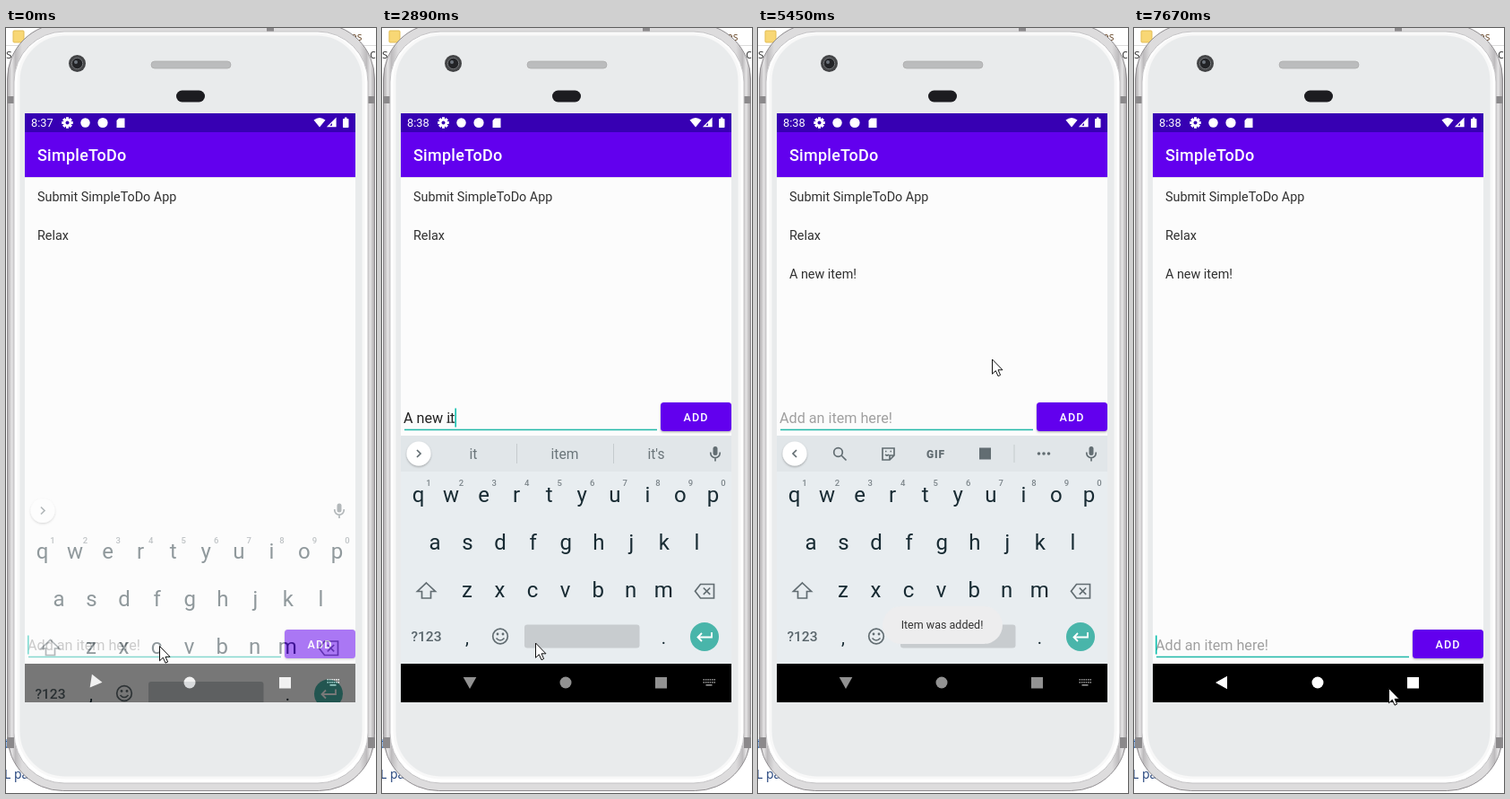
An HTML page that plays this animation: 413x852 px, repeating every 8 s.

```html
<!DOCTYPE html>
<html lang="en">
<head>
<meta charset="utf-8">
<title>To-do list demo</title>
<style>
  html, body { margin: 0; width: 100%; height: 100%; overflow: hidden; background: #fff; }
  svg { display: block; width: 413px; height: 852px; font-family: Roboto, sans-serif; }
  text { white-space: pre; }
  .mid { text-anchor: middle; }
  .line { fill: none; stroke: #626d72; stroke-width: 1.7; }
  .key { font-size: 24px; fill: #182b33; }
  .hint { font-size: 9.5px; font-weight: 500; fill: #7d868b; }
  .word { font-size: 15.6px; fill: #6b757a; }
  .item { font-size: 14.36px; fill: #303030; }
  .page { font: 14px "Open Sans", sans-serif; }
</style>
</head>
<body>
<svg viewBox="0 0 413 852">
  <defs>
    <clipPath id="screen"><path d="M21 95h369v656H21z"/></clipPath>
    <clipPath id="navArea"><path d="M21 708h369v43H21z"/></clipPath>
    <linearGradient id="metal">
      <stop offset="0" stop-color="#aaa7a9"/><stop offset=".012" stop-color="#e4e3e4"/>
      <stop offset=".022" stop-color="#bdbbbd"/><stop offset=".04" stop-color="#dddcdd"/>
      <stop offset=".96" stop-color="#dddcdd"/><stop offset=".978" stop-color="#bdbbbd"/>
      <stop offset=".988" stop-color="#e4e3e4"/><stop offset="1" stop-color="#aaa7a9"/>
    </linearGradient>
    <filter id="soft" x="-20%" y="-20%" width="140%" height="160%">
      <feDropShadow dx="0" dy="1.2" stdDeviation="1" flood-opacity=".3"/>
    </filter>
  </defs>
  <g id="desktop"></g>
  <g id="phone"></g>
  <g clip-path="url(#screen)">
    <g id="app"></g>
    <g id="nav"></g>
    <g id="keyboard"></g>
    <g id="toast">
      <rect x="139" y="644" width="134" height="42" rx="21" fill="#ededee"/>
      <text class="mid" x="205.5" y="669" font-size="12.5" fill="#333">Item was added!</text>
    </g>
  </g>
  <path id="pointer" d="M0 0V16.3L3.8 12.7L6.5 18.7L9.1 17.5L6.5 11.8H11.5Z" fill="#fff" stroke="#111" stroke-width="1"/>
</svg>
<script>
const $ = id => document.getElementById(id);
const set = (id, attrs) => { for (const k in attrs) $(id).setAttribute(k, attrs[k]); };
const label = (cls, x, y, s, more = '') => `<text class="${cls}" x="${x}" y="${y}" ${more}>${s}</text>`;
const box = (x, y, w, h, fill, more = '') => `<rect x="${x}" y="${y}" width="${w}" height="${h}" fill="${fill}" ${more}/>`;
const dot = (x, y, r, fill, more = '') => `<circle cx="${x}" cy="${y}" r="${r}" fill="${fill}" ${more}/>`;
const path = (d, fill, more = '') => `<path d="${d}" fill="${fill}" ${more}/>`;
const stroke = d => `<path class="line" d="${d}"/>`;

$('desktop').innerHTML =
  box(8, 3, 12, 13, '#f8d775', 'rx="1" stroke="#e3bd54"') +
  label('page', 31, 14, 'F', 'fill="#6b4a2b" style="font-size:12px"') +
  label('page', 376, 14, 'ives', 'fill="#6b4a2b" style="font-size:12px"') +
  box(0, 19, 413, 1, '#ddd') +
  label('page', 0, 34, 's .', 'fill="#444"') + label('page', 406, 34, 'c', 'fill="#444"') +
  label('page', -2, 802, 't', 'fill="#1b5fb8"') + label('page', -2, 836, 'L pa', 'fill="#1d3e78"');

const band = (x, y, w, h) => box(x, y, w, h, '#8b898b');
$('phone').innerHTML =
  box(1.5, -5, 410, 854.5, 'url(#metal)', 'rx="62" stroke="#8f8c8f"') +
  band(1, 76, 8, 8) + band(404, 76, 8, 8) + band(1, 790, 8, 12) + band(404, 790, 8, 12) + band(291, -1, 8, 5) +
  box(9, 4, 395, 837, '#fff', 'rx="56" stroke="#c4c3c5"') +
  box(14, 7, 385, 828, '#e9ebec', 'rx="52" stroke="#f8f8f8" stroke-width="3"') +
  dot(79.5, 39.5, 9.5, '#444547') + dot(79.5, 39.5, 6.2, '#222326', 'stroke="#77797c"') + dot(78, 38, 2, '#6c737b') +
  box(162, 37, 89, 8, '#bbbcbd', 'rx="4" stroke="#aaa" stroke-width=".7"') +
  box(190, 69.5, 32, 13, '#1c1c20', 'rx="6.5"');

const gear = Array.from({ length: 8 }, (_, i) => box(67, 99.5, 3, 12, '#fff', `transform="rotate(${i * 45} 68.5 105.5)"`)).join('');
$('app').innerHTML =
  box(21, 95, 369, 656, '#fcfcfc') + box(21, 95, 369, 21, '#3700b3') + box(21, 116, 369, 50, '#6200ee') +
  box(21, 166, 369, 1, '#e4e0ea') +
  label('', 28, 110, '8:37', 'id="clock" fill="#fff" font-size="12.8"') +
  gear + dot(68.5, 105.5, 2, '#3700b3') + dot(88.5, 105.5, 5.2, '#fff') + dot(108, 105.5, 5.6, '#fff') +
  path('M126 100.5h6.5v10.5h-9v-8z', '#fff') +
  path('M343.5 102.5Q350 97.500 356.500 102.5L350 110.5Z', '#fff') +
  path('M359.500 109.5L368 101V109.5Z', 'none', 'stroke="#fff" stroke-width="1.3"') +
  path('M364 109.500V105l4-4v8.500z', '#fff') +
  box(376, 101, 6.500, 10, '#fff', 'rx=".7"') + box(378, 99.500, 2.500, 2, '#fff') +
  label('', 35, 148, 'SimpleToDo', 'fill="#fff" font-size="18" font-weight="500" letter-spacing=".25"') +
  label('item', 35, 193, 'Submit SimpleToDo App') + label('item', 35, 236, 'Relax') +
  label('item', 35, 279, 'A new item!', 'id="added"') +
  `<g id="field">${box(21, 416, 369, 38, '#fcfcfc')}
    ${box(25, 446.7, 282, 1.5, '#20b8a8')}
    ${label('', 24, 440, '', 'id="entry" font-size="16.16"')}
    ${box(0, 438.7, 0, 1, '#444', 'id="compose"')}
    ${box(0, 423.5, 1.6, 21, '#12bfae', 'id="caret"')}
    ${box(311, 417, 79, 32, '#6200ee', 'id="button" rx="3.5" filter="url(#soft)"')}
    ${label('mid', 350.5, 438, 'ADD', 'fill="#fff" font-size="12.57" font-weight="500" letter-spacing="1.1"')}</g>`;

const keyIcon = [0, 1, 2].map(r => Array.from({ length: r < 2 ? 6 : 1 }, (_, i) =>
  box(358.500 + (r < 2 ? i * 2.400 : 3), 725 + r * 3, r < 2 ? 1.500 : 7, 1.6, 'currentColor')).join('')).join('');
$('nav').innerHTML = box(21, 708, 369, 43, '#000') +
  `<g clip-path="url(#navArea)">${box(52, 706, 92, 46, '#3a3a3a', 'id="ripple" rx="22"')}</g>` +
  path('M-7 0L6 -7.300V7.300Z', 'currentColor', 'id="back"') + dot(205, 729, 6.500, 'currentColor') +
  box(305, 723, 13, 12.500, 'currentColor') + `<g id="switcher">${keyIcon}</g>`;

const keyRow = (keys, x, y) => [...keys].map((k, i) => label('key mid', x + i * 36.55, y, k)).join('');
$('keyboard').innerHTML = box(21, 454, 369, 254, '#e8edf0', 'id="plate"') + box(21, 454, 369, 40, '#e1e6e9', 'id="strip"') +
  dot(41, 474, 13.5, '#fff', 'filter="url(#soft)"') + `<path id="chevron" class="line"/>` +
  `<g id="words">${box(150, 463, 1, 22, '#c5cbce')}${box(258, 463, 1, 22, '#c5cbce')}
    ${[0, 1, 2].map(i => label('word mid', 102 + i * 102, 480, '', `id="word${i}"`)).join('')}</g>` +
  `<g id="tools">${stroke('M93.500 476.500L98.500 481.500M94.300 472.500a4.800 4.800 0 1 1 -9.600 0a4.800 4.800 0 1 1 9.600 0')}
    ${stroke('M139 468h13v8l-5 5h-8zM152 476h-5v5M142 471.500h1.500M147.500 471.500h1.500M142 475q2 2 4 0')}
    ${label('mid', 198.500, 478.500, 'GIF', 'font-size="12" font-weight="900" letter-spacing=".8" fill="#626d72"')}
    ${box(247, 467.500, 13, 13, '#626d72')}${box(285.500, 464, 1, 20, '#c5cbce')}
    ${[313.500, 319, 324.500].map(x => dot(x, 474, 1.8, '#626d72')).join('')}</g>` +
  box(369.500, 466, 5, 10, '#626d72', 'rx="2.500"') + stroke('M366.800 472.500v1a5.200 5.200 0 0 0 10.400 0v-1M372 478.500v4') +
  keyRow('qwertyuiop', 40.5, 527.5) + keyRow('asdfghjkl', 59, 580.5) + keyRow('zxcvbnm', 95, 633.5) +
  [...'1234567890'].map((n, i) => label('hint mid', 52 + i * 36.55, 510, n)).join('') +
  stroke('M49.500 618L59.500 627.500H54.500V635H44.500V627.500H39.500Z') +
  stroke('M355.500 619.500H370.500V635H355.500L349.500 627.200ZM358.800 623.500l7.400 7.400M366.200 623.500l-7.400 7.400') +
  label('mid', 49.500, 683, '?123', 'font-size="15.5" font-weight="500" fill="#58646a"') +
  label('key mid', 95, 685.5, ',', 'style="font-size:20px"') + label('key mid', 314.5, 685.5, '.', 'style="font-size:20px"') +
  stroke('M140.300 677.500a8.300 8.300 0 1 1 -16.600 0a8.300 8.300 0 1 1 16.600 0M127.500 679.500q4.500 5 9 0') +
  dot(129, 675, 1.400, '#626d72') + dot(135, 675, 1.400, '#626d72') +
  box(159, 664.500, 128.500, 26, '#c8cccf', 'rx="3"') + dot(360, 678, 16, '#49b5aa') +
  path('M368 673v5.500H353M357 674l-4.500 4.500l4.500 4.500', 'none', 'stroke="#fff" stroke-width="1.8"');

// Each step lists only what differs from the one before.
const start = { at: 0, p: [171, 688], s: '', u: -1, w: ['', '', ''], caret: 1, low: 1, drop: 63.5, kb: .47, pale: 1,
  turn: -52, lit: '#e8e8e8', ripple: 0, switcher: 1, btn: '#6200ee', toast: 0, added: 0, clock: '8:37', tools: 0 };
const steps = [start,
  { at: 130, low: 0, drop: 0, kb: 1, pale: 0, turn: -90, lit: '#929292', caret: 0, w: ['I', 'Hi', 'Thank'] },
  { at: 280, p: [171, 686] }, { at: 400, p: [171, 684.5], caret: 1 },
  { at: 950, caret: 0 }, { at: 1370, caret: 1 },
  { at: 1510, s: 'A', u: 0, w: ['a', 'A', 'as'] },
  { at: 1790, s: 'A ', u: -1, w: ['little', 'new', 'good'] },
  { at: 2190, caret: 0 },
  { at: 2340, s: 'A ne', u: 2, caret: 1, w: ['ne', 'new', 'need'] },
  { at: 2470, s: 'A new', w: ['new', 'news', 'never'] },
  { at: 2630, s: 'A new ', u: -1, w: ['one', 'year', 'phone'] },
  { at: 2770, s: 'A new i', u: 6, w: ['i', 'idea', 'in'], clock: '8:38' },
  { at: 2890, s: 'A new it', w: ['it', 'item', "it's"] },
  { at: 3040, s: 'A new ite', w: ['ite', 'item', 'items'] },
  { at: 3190, s: 'A new item', w: ['item', 'items', 'itemized'] },
  { at: 3620, s: 'A new item!', u: -1, tools: 1 },
  { at: 3740, p: [215, 686] }, { at: 3860, p: [278, 685] },
  { at: 4010, p: [340, 600] }, { at: 4130, p: [364, 506] },
  { at: 4290, p: [326, 430], caret: 0 }, { at: 4440, p: [327.500, 432] },
  { at: 4580, btn: '#7219ef' },
  { at: 4700, btn: '#7e2df1', s: '', caret: 1 },
  { at: 4820, btn: '#8a41f2' },
  { at: 4970, btn: '#7c2af0', added: 1, toast: .3 },
  { at: 5060, btn: '#6b0fee', toast: .7, p: [300, 415] },
  { at: 5180, btn: '#6200ee', toast: 1, p: [266, 385], caret: 0 },
  { at: 5330, p: [263, 371] }, { at: 5450, p: [261, 368.500] },
  { at: 5700, caret: 1 }, { at: 5980, p: [261.500, 369] },
  { at: 6140, p: [230, 520], caret: 0 }, { at: 6260, p: [185, 700] }, { at: 6380, p: [170.500, 782] },
  { at: 6530, p: [150, 774] }, { at: 6650, p: [115, 745], caret: 1 },
  { at: 6770, p: [104, 737], ripple: .6 }, { at: 6890, ripple: .9 },
  { at: 7010, low: 1, drop: 10.5, kb: .8, turn: -52, lit: '#e0e0e0', ripple: 1, switcher: 0, toast: .55 },
  { at: 7160, drop: 38, kb: .42, turn: -22, toast: .15, ripple: .7 },
  { at: 7280, drop: 62, kb: .12, turn: -4, lit: '#fff', toast: 0, ripple: .3, caret: 0 },
  { at: 7400, kb: 0, turn: 0, ripple: 0 },
  { at: 7550, p: [205, 741], caret: 1 }, { at: 7670, p: [284, 735] }
];
for (let i = 1; i < steps.length; i++) steps[i] = { ...steps[i - 1], ...steps[i] };

const ruler = document.createElement('canvas').getContext('2d');
ruler.font = '16.16px Roboto, sans-serif';
const widthOf = s => ruler.measureText(s).width;

function draw(f) {
  const end = 24 + widthOf(f.s), from = 24 + widthOf(f.s.slice(0, Math.max(f.u, 0)));
  $('clock').textContent = f.clock;
  $('entry').textContent = f.s || 'Add an item here!';
  set('entry', { fill: f.s ? '#222' : '#a0a0a0' });
  set('caret', { x: end, opacity: f.caret });
  set('compose', { x: from, width: f.u < 0 ? 0 : end - from });
  set('field', { transform: `translate(0 ${f.low ? 253 : 0})` });
  set('button', { fill: f.btn });
  set('added', { opacity: f.added });
  set('toast', { opacity: f.toast });
  set('keyboard', { transform: `translate(0 ${f.drop})`, opacity: f.kb });
  set('plate', { fill: f.pale ? '#fcfcfc' : '#e8edf0' });
  set('strip', { opacity: 1 - f.pale });
  set('words', { opacity: f.pale || f.tools ? 0 : 1 });
  set('tools', { opacity: f.tools });
  set('chevron', { d: f.tools ? 'M43 470l-4 4l4 4' : 'M39 470l4 4l-4 4' });
  f.w.forEach((s, i) => $('word' + i).textContent = s);
  set('nav', { color: f.lit });
  set('back', { transform: `translate(98 729) rotate(${f.turn})` });
  set('ripple', { opacity: f.ripple });
  set('switcher', { opacity: f.switcher });
  set('pointer', { transform: `translate(${f.p[0] + .5} ${f.p[1] + .5})` });
}

let shown;
function tick() {
  const t = performance.now() % 8000;
  const step = steps.findLast(s => s.at <= t);
  if (step !== shown) draw(shown = step);
  requestAnimationFrame(tick);
}
tick();
</script>
</body>
</html>
```
